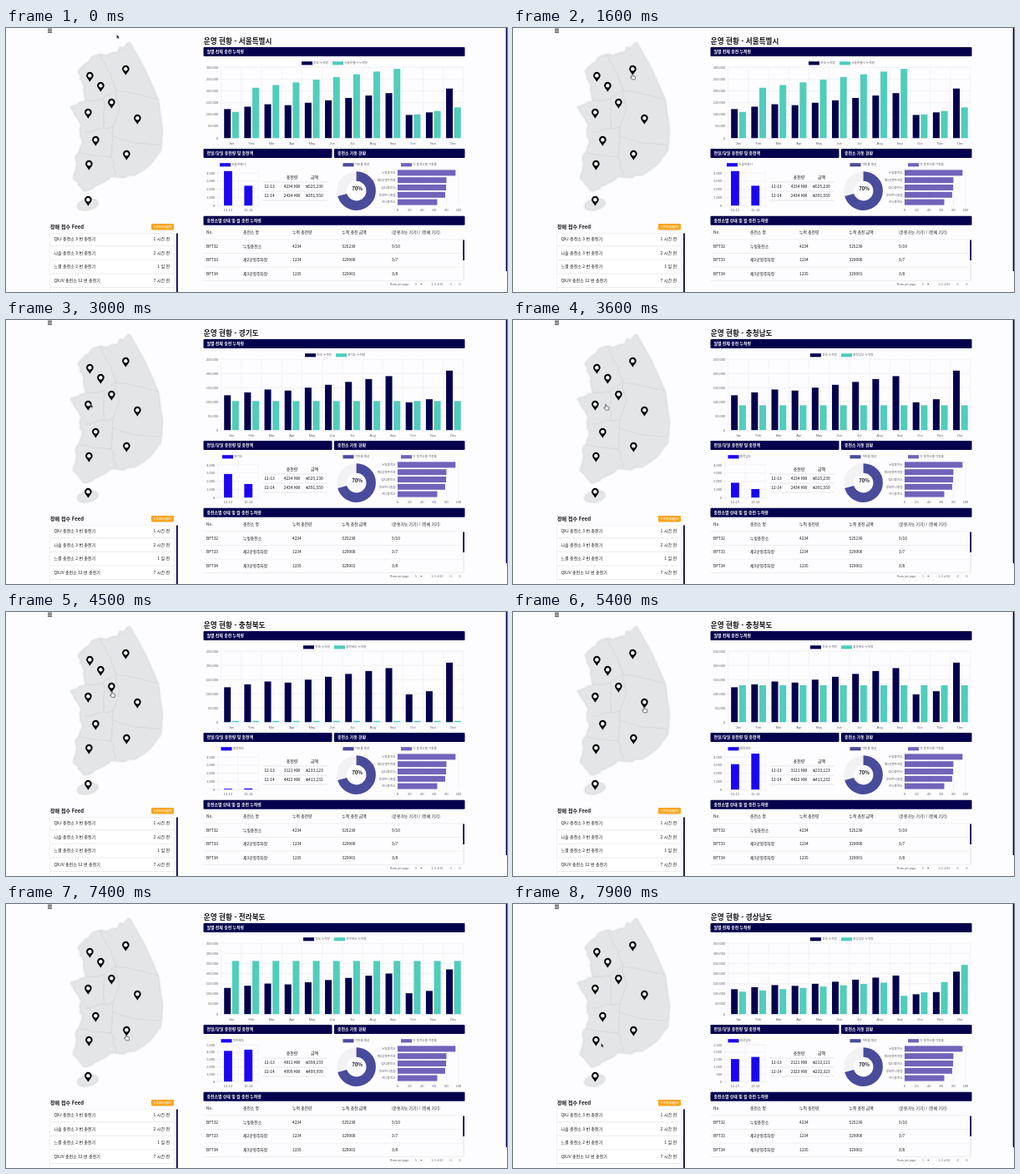
These frames come from a looping animation (600x317 px, 8000 ms). An HTML page:

```html
<!DOCTYPE html>
<html lang="ko">
<head>
<meta charset="utf-8">
<title>충전소 운영 현황</title>
<style>
  html, body { margin: 0; width: 100%; height: 100%; overflow: hidden; background: #fdfcfe; }
  svg { display: block; width: 100vw; height: 100vh; }
  text { font-family: "Noto Sans CJK KR", "Noto Sans CJK", "Noto Sans", sans-serif; }
  .label { font-family: "Liberation Sans", "Noto Sans CJK KR", "Noto Sans CJK", sans-serif; }
</style>
</head>
<body>
<svg viewBox="0 0 600 317" preserveAspectRatio="none">
  <g id="fixed"></g>
  <g id="live"></g>
</svg>
<script>
const LOOP = 8000, STEP = 100, GROW = 1000, TRAVEL = 420;
const NAVY = '#04004d', TEAL = '#50cdbb', BLUE = '#1c05f2', INDIGO = '#494b9b', PURPLE = '#7163ba';
const INK = '#17171c', GREY = '#5f5f64', LINE = '#e4e4e8';

const rect = (x, y, w, h, fill, r = 0) =>
  `<rect x="${x}" y="${y}" width="${w}" height="${h}" fill="${fill}" rx="${r}"/>`;
const line = (x1, y1, x2, y2, color = LINE, w = 0.5) =>
  `<path d="M${x1} ${y1}L${x2} ${y2}" stroke="${color}" stroke-width="${w}"/>`;
// y is the vertical middle of the text
const text = (s, x, y, size = 4.9, anchor = 'start', weight = 500, fill = INK, cls = '') =>
  `<text class="${cls}" x="${x}" y="${y + size * 0.36}" font-size="${size}" fill="${fill}" text-anchor="${anchor}" font-weight="${weight}">${s}</text>`;
const label = (s, x, y, anchor = 'middle', size = 4) => text(s, x, y, size, anchor, 400, GREY, 'label');
const key = (x, y, color, s) => rect(x, y, 13, 4.2, color) + label(s, x + 14.3, y + 2, 'start', 3.6);
const range = n => [...Array(n).keys()];
const commas = v => v.toLocaleString('en-US');

// monthly totals, in thousands
const MONTHS = 'Jan Feb Mar Apr May Jun Jul Aug Sep Oct Nov Dec'.split(' ');
const nation = i => i < 9 ? (i < 3 ? 123 : 109) + 10.2 * i : i < 11 ? 98 + 11 * (i - 9) : 210;
const flat = v => () => v;

const roundUp = (values, unit) => Math.ceil(Math.max(...values) / unit) * unit;
function region(start, name, monthly, kw = [4234, 2434], won = [525230, 391550]) {
  const top = roundUp(range(12).flatMap(i => [nation(i), monthly(i)]), 50);
  const max = roundUp(kw, 500);
  return { start, name, monthly, kw, won, top, max, tick: max > 2500 ? 1000 : 500 };
}

// start is the click on the map pin of the same index
const REGIONS = [
  region(1200, '서울특별시', i => i < 1 ? 111 : i < 9 ? 202 + 11.4 * i : 100 + 15 * (i - 9)),
  region(1960, '강원도', i => i < 10 ? 102 : 194 + 18 * (i - 10), [4124, 5612], [424277, 512312]),
  region(2750, '경기도', flat(150)),
  region(3469, '충청남도', flat(204)),
  region(4492, '충청북도', flat(130), [3121, 4412], [233123, 413232]),
  region(6137, '경상북도', flat(141), [2342, 2343], [141414, 151515]),
  region(7000, '전라북도', flat(302), [4811, 4999], [398193, 499999]),
  region(7625, '경상남도', i => i < 8 ? 153 + 8.8 * i : 125 + 23.5 * (i - 8) ** 2, [2121, 2323], [212121, 232323])
];
const PINS = [[100, 58], [143, 50], [113, 70], [98, 102], [126, 90], [157, 109], [107, 135], [144, 152], [99, 164], [98, 207]];

const COAST = [[148, 18], [166, 50], [182, 86], [187, 122], [185, 147], [171, 165], [155, 176], [130, 178], [110, 188], [93, 195],
  [82, 182], [84, 158], [92, 134], [88, 112], [78, 95], [96, 88], [92, 65], [87, 52], [106, 34], [130, 30], [148, 18]];
const BORDERS = [
  [[111, 31], [123, 52], [132, 74], [117, 85], [97, 87]], [[132, 74], [160, 80], [182, 86]],
  [[132, 74], [135, 100], [128, 119], [94, 125]], [[117, 85], [117, 120]],
  [[128, 119], [126, 155], [88, 150]], [[128, 130], [155, 138], [184, 140]], [[126, 155], [132, 177]]
];

let seed = 11;
const random = () => (seed = seed * 16807 % 2147483647) / 2147483647 - 0.5;

// a line through the points, roughened except along the smooth east coast
function rough(points, size) {
  const out = points.slice(1).flatMap(([x, y], i) => range(5).map(k => {
    const u = k / 5, [px, py] = points[i];
    const qx = px + (x - px) * u, qy = py + (y - py) * u;
    const amp = k === 0 ? 0 : qx > 150 ? 0.6 : size;
    return [qx + random() * amp, qy + random() * amp];
  }));
  return 'M' + [...out, points.at(-1)].map(p => p.map(v => v.toFixed(1)).join(' ')).join('L');
}

function map() {
  const pin = ([x, y]) => `<g transform="translate(${x + 0.4} ${y + 0.8})">
    <path d="M0 6C-1.3 3 -4.3 1.3 -4.3 -1.7A4.3 4.3 0 0 1 4.3 -1.7C4.3 1.3 1.3 3 0 6Z" fill="#050505"/>
    <circle cy="-1.5" r="2.2" fill="#fff"/></g>`;
  const land = `<path d="${rough(COAST, 4)}Z"/><ellipse cx="98" cy="212" rx="12" ry="6" transform="rotate(-12 98 212)"/>`;
  return `<g fill="none" stroke="#eff0f2" stroke-width="4" stroke-linejoin="round">${land}</g>` +
    `<use href="#land"/><g id="land" fill="#e3e5e8" stroke="#d6d9de" stroke-width=".6">${land}</g>` +
    `<path d="${BORDERS.map(b => rough(b, 3)).join('')}" fill="none" stroke="#cdd1d6" stroke-width=".6"/>` +
    PINS.map(pin).join('');
}

function card(x, y, w, title) {
  return rect(x, y, w, 11, NAVY, 1) + text(title, x + 4, y + 5.6, 4.9, 'start', 700, '#fff');
}

function feed() {
  const rows = [['QXJ 충전소 3 번 충전기', '1 시간 전'], ['나솔 충전소 3 번 충전기', '2 시간 전'],
    ['느결 충전소 2 번 충전기', '1 일 전'], ['QXJV 충전소 12 번 충전기', '7 시간 전']];
  return text('장애 접수 Feed', 53, 238.6, 6.1, 'start', 700) +
    rect(174, 235, 27, 7.6, '#f9a51f', 1) + text('5 messages', 187.5, 238.8, 4, 'middle', 400, '#fff') +
    `<path d="M52.5 317V246.5H201V317" fill="#fff" stroke="${LINE}" stroke-width=".5"/>` +
    rect(204, 246.5, 1.8, 71, NAVY) +
    rows.map(([a, b], i) => {
      const y = 253.4 + i * 16.6;
      return text(a, 57.5, y, 5) + text(b, 196, y, 5, 'end') + line(53, y + 8.3, 201, y + 8.3, '#d6d6da');
    }).join('');
}

function rates() {
  const bars = [['누빛충전소', 95], ['제2공영주차장', 80], ['QXJ충전소', 79.5], ['루모트나솔점', 78], ['하늬충전소', 65]];
  const r = 17.6, turn = 2 * Math.PI * r;
  const ring = (color, part) => `<circle cx="419.6" cy="195.6" r="${r}" fill="none" stroke="${color}" stroke-width="11.4"
    stroke-dasharray="${turn * part} ${turn}" transform="rotate(-90 419.6 195.6)"/>`;
  return ring('#f2f2f4', 1) + ring(INDIGO, 0.7) + text('70%', 420.6, 193.2, 6, 'middle', 700) +
    key(403.5, 162.2, INDIGO, '가동률 평균') + key(473, 162.2, PURPLE, '각 충전소별 가동률') +
    range(6).map(i => line(469 + i * 14.6, 169, 469 + i * 14.6, 214.5) + label(i * 20, 469 + i * 14.6, 218.8)).join('') +
    bars.map(([name, v], i) => rect(469, 170.4 + i * 8.8, v * 0.73, 7, PURPLE) +
      label(name, 466.5, 173.9 + i * 8.8, 'end', 3.6)).join('');
}

function stations() {
  const cols = [240, 284, 343, 402.5, 462];
  const rows = [['No.', '충전소 명', '누적 충전량', '누적 충전 금액', '(운용가능 기기) / (전체 기기)'],
    ['BFT32', '누빛충전소', '4234', '525230', '9/10'],
    ['BFT33', '제2공영주차장', '1234', '329000', '3/7'],
    ['BFT34', '제3공영주차장', '1235', '329001', '3/8']];
  return rows.map((row, j) => {
    const y = 245.7 + j * 16.5;
    return row.map((s, i) => text(s, cols[i], y, 4.8)).join('') + line(236.5, y + 8.3, 547, y + 8.3, '#dedee2');
  }).join('') +
    rect(547.3, 254.5, 1.7, 49, '#ececf0') + rect(547.3, 254.5, 1.7, 24.5, NAVY) +
    label('Rows per page:', 460, 307.7, 'start', 3.3) + label('5', 490, 307.7, 'start', 3.3) +
    label('1–5 of 10', 509.5, 307.7, 'start', 3.3) +
    `<path d="M496 307h2.6l-1.3 1.5z" fill="${GREY}"/>
    <path d="M533.6 306l-1.5 1.6 1.5 1.6M542.6 306l1.5 1.6 -1.5 1.6" fill="none" stroke="${GREY}" stroke-width=".6"/>`;
}

function fixed() {
  return [1.3, 3.3, 5.3].map(y => line(50, y, 55, y, '#111', 0.9)).join('') +
    map() + feed() +
    card(236.5, 23, 313, '월별 전체 충전 누적량') + card(236.5, 145, 154, '전일/당일 충전량 및 충전액') +
    card(393, 145, 156.5, '충전소 가동 현황') + card(236.5, 225.7, 313, '충전소별 상태 및 월 충전 누적량') +
    rates() + stations() + rect(598.7, 0, 1.3, 292, NAVY);
}

// gridlines and value labels of a bar chart
function axes(x, base, h, w, n, top, tick, unit) {
  const rows = range(Math.floor(top / tick) + 1).map(k => {
    const y = base - h * k * tick / top;
    return line(x - 2.5, y, x + w * n, y) + label(commas(k * tick * unit), x - 3.6, y, 'end');
  });
  const cols = range(n + 1).map(i => line(x + i * w, base - h, x + i * w, base + 2.5, '#ededf1'));
  return rows.join('') + cols.join('');
}

function monthlyChart(cur, prev, p) {
  const x = 257.8, w = 24.17, base = 132.2, h = 85;
  const lx = 364 - cur.name.length * 2;
  return key(lx, 40.2, NAVY, '전국 누적량') + key(lx + 37, 40.2, TEAL, cur.name + ' 누적량') +
    axes(x, base, h, w, 12, cur.top, 50, 1000) +
    MONTHS.map((m, i) => {
      const c = x + w * (i + 0.5);
      const from = nation(i) / prev.top, to = nation(i) / cur.top;
      const a = h * (from + (to - from) * p), b = h * p * cur.monthly(i) / cur.top;
      return rect(c - 8.7, base - a, 8, a, NAVY) + rect(c + 1, base - b, 8, b, TEAL) + label(m, c, 138.6);
    }).join('');
}

function dailyChart(cur, p) {
  const x = 253.8, w = 24.3, base = 213.2, h = 44;
  return key(263.5 - cur.name.length * 1.5, 162.2, BLUE, cur.name) +
    axes(x, base, h, w, 2, cur.max, cur.tick, 1) +
    cur.kw.map((v, i) => {
      const c = x + w * (i + 0.5), b = h * p * v / cur.max;
      return rect(c - 4.9, base - b, 9.8, b, BLUE) + label('12-1' + (3 + i), c, 218.8);
    }).join('');
}

function dailyTable(cur) {
  const rows = [['', '충전량', '금액'], ...cur.kw.map((v, i) => ['12-1' + (3 + i), v + ' KW', '₩' + commas(cur.won[i])])];
  return rows.map((row, j) => {
    const y = 179.3 + j * 11;
    return row.map((s, i) => text(s, 315.5 + i * 27, y, 4.9, 'middle')).join('') +
      line(307.5, y + 5.7, 384.5, y + 5.7, '#cfcfd4');
  }).join('');
}

// the pointer rests under each pin until its click, then goes to the next
function pointer(t) {
  const stops = [[132.5, 3], ...PINS], leave = [200, ...REGIONS.map(r => r.start)];
  const i = Math.max(0, leave.findLastIndex(v => v <= t));
  const u = Math.min(1, Math.max(0, (t - leave[i]) / TRAVEL));
  const e = Math.sin(u * Math.PI / 2);
  const [x, y] = stops[i].map((v, k) => v + (stops[i + 1][k] - v) * e);
  const hand = u > 0.9 || (i > 0 && t < leave[i] + 150);
  const shape = hand
    ? '<path d="M-.7 .4Q0 -.4 .7 .4V2.6L3.4 3.2Q4 3.4 3.9 4.2L3.3 7H-.4L-2.4 4.2Q-2.2 3.3 -.7 4.3Z" fill="#fff" stroke="#222" stroke-width=".6"/>'
    : '<path d="M0 0V5L1.2 4 2 5.7 2.9 5.3 2.1 3.7H3.7Z" fill="#111" stroke="#fff" stroke-width=".4"/>';
  return `<g transform="translate(${x} ${y + 4.8})">${shape}</g>`;
}

function draw(t) {
  const i = Math.max(0, REGIONS.findLastIndex(r => r.start <= t));
  const cur = REGIONS[i], prev = REGIONS[Math.max(0, i - 1)];
  const p = i ? 1 - (1 - Math.min(1, (t - cur.start) / GROW)) ** 4 : 1;
  live.innerHTML = text('운영 현황 - ' + cur.name, 236.8, 15.9, 8.6, 'start', 900) +
    monthlyChart(cur, prev, p) + dailyChart(cur, p) + dailyTable(cur) + pointer(t);
}

const live = document.getElementById('live');
document.getElementById('fixed').innerHTML = fixed();

let shown = -1;
const began = performance.now();
function tick() {
  const t = Math.floor((performance.now() - began) % LOOP / STEP) * STEP;
  if (t !== shown) draw(shown = t);
  requestAnimationFrame(tick);
}
tick();
</script>
</body>
</html>
```
